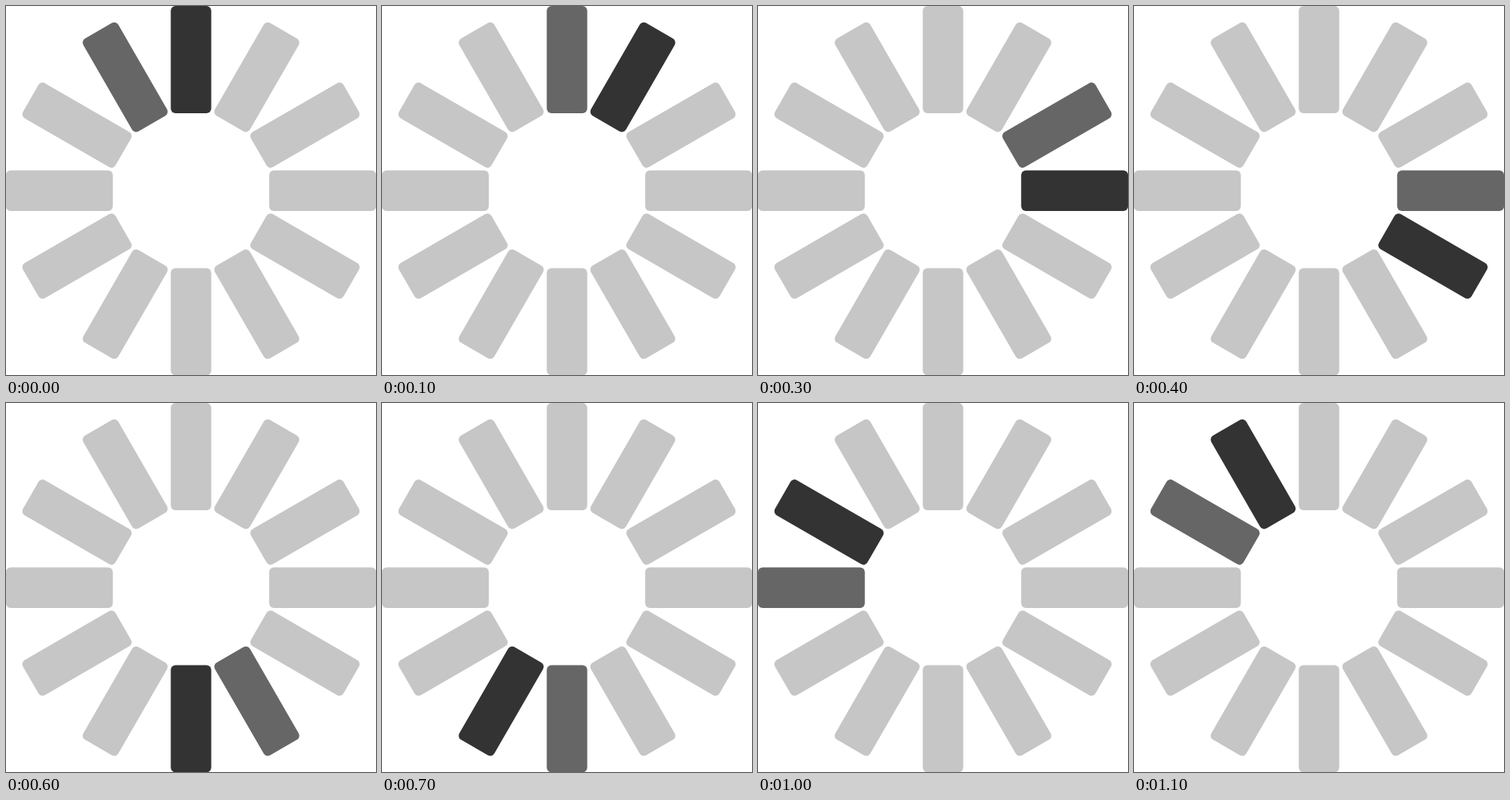
Recreate the animation shown at these times as an HTML page. Size 470 by 468 pixels, loop 1.2 s.

```html
<!DOCTYPE html>
<html lang="en">
<head>
<meta charset="utf-8">
<title>Loading spinner</title>
<style>
  html, body { margin: 0; width: 100%; height: 100%; overflow: hidden; background: #fff; }
  svg { display: block; width: 470px; height: 468px; }
</style>
</head>
<body>
<svg id="spinner" viewBox="0 0 470 468"></svg>
<script>
  const COUNT = 12, STEP_MS = 100;
  const HEAD = '#333333', TAIL = '#666666', IDLE = '#c6c6c6';
  const spinner = document.getElementById('spinner');

  const bars = Array.from({ length: COUNT }, (_, i) => {
    const bar = document.createElementNS('http://www.w3.org/2000/svg', 'rect');
    const angle = i * 2 * Math.PI / COUNT;
    const x = 235 + 167.2 * Math.sin(angle);
    const y = 234.2 - 166.2 * Math.cos(angle);
    const attrs = {
      x: -25.7, y: -67.9, width: 51.4, height: 135.8, rx: 6,
      transform: `translate(${x} ${y}) rotate(${i * 360 / COUNT})`
    };
    for (const name in attrs) bar.setAttribute(name, attrs[name]);
    return spinner.appendChild(bar);
  });

  const start = performance.now();

  function draw(now) {
    const head = Math.floor(Math.max(0, now - start) / STEP_MS) % COUNT;
    bars.forEach((bar, i) => {
      const age = (head - i + COUNT) % COUNT;
      bar.setAttribute('fill', [HEAD, TAIL][age] || IDLE);
    });
    requestAnimationFrame(draw);
  }
  draw(start);
</script>
</body>
</html>
```
